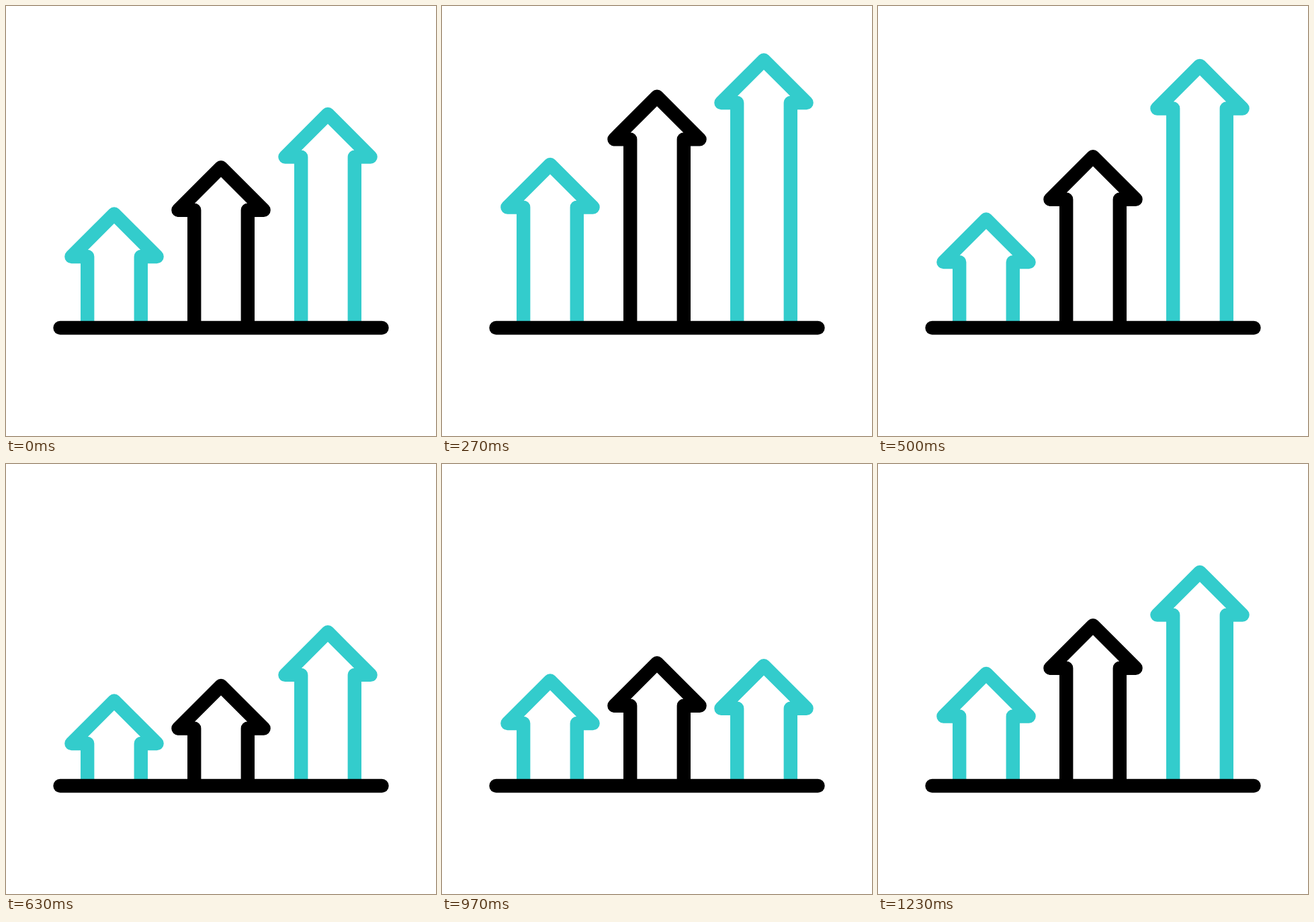
An HTML page that plays this animation: 640 px wide and 640 px high, repeating every 1400 ms.

```html
<!DOCTYPE html>
<html lang="en">
<head>
<meta charset="utf-8">
<title>Rising arrows</title>
<style>
  html, body { margin: 0; width: 100%; height: 100%; overflow: hidden; background: #fff; }
  svg { display: block; width: 100%; height: 100%; }
  .line { fill: none; stroke: #000; stroke-width: 20.4; stroke-linecap: round; stroke-linejoin: round; }
  .teal { stroke: #33cccc; }
</style>
</head>
<body>
<svg viewBox="0 0 640 640">
  <defs>
    <clipPath id="above"><rect width="640" height="479"/></clipPath>
    <path id="arrow" d="M-39.8 400V0H-63.6L0-63.6L63.6 0H39.8V400"/>
  </defs>
  <g clip-path="url(#above)">
    <use class="line teal" href="#arrow"/>
    <use class="line" href="#arrow"/>
    <use class="line teal" href="#arrow"/>
  </g>
  <path class="line" d="M80.5 479H559.5"/>
</svg>
<script>
  const LOOP = 1400, FPS = 30;

  // Shoulder heights, and the [start, end] times of rise, fall and return in ms
  const arrows = [
    { x: 161, rest: 375.5, high: 299.5, low: 416, moves: [[-32, 261], [261, 636], [680, 1110]] },
    { x: 320, rest: 303.7, high: 185.7, low: 410, moves: [[34, 326], [328, 694], [759, 1190]] },
    { x: 479, rest: 224.6, high: 91.5, low: 410, moves: [[108, 386], [395, 770], [838, 1233]] }
  ];
  const shapes = document.querySelectorAll('use');

  function ease(t, [start, end]) {
    const u = Math.min(1, Math.max(0, (t - start) / (end - start)));
    return u * u * (3 - 2 * u);
  }

  function height({ rest, high, low, moves: [rise, fall, back] }, t) {
    return rest
      + (high - rest) * ease(t, rise)
      + (low - high) * ease(t, fall)
      + (rest - low) * ease(t, back);
  }

  function draw(ms) {
    // Poses step at 30 per second, with times rounded to 10 ms
    const t = Math.floor((ms % LOOP + 4) * FPS / 1000) * 1000 / FPS % LOOP;
    arrows.forEach((a, i) =>
      shapes[i].setAttribute('transform', `translate(${a.x} ${height(a, t).toFixed(2)})`));
  }

  const begin = performance.now();
  function tick() {
    draw(performance.now() - begin);
    requestAnimationFrame(tick);
  }
  tick();
</script>
</body>
</html>
```
